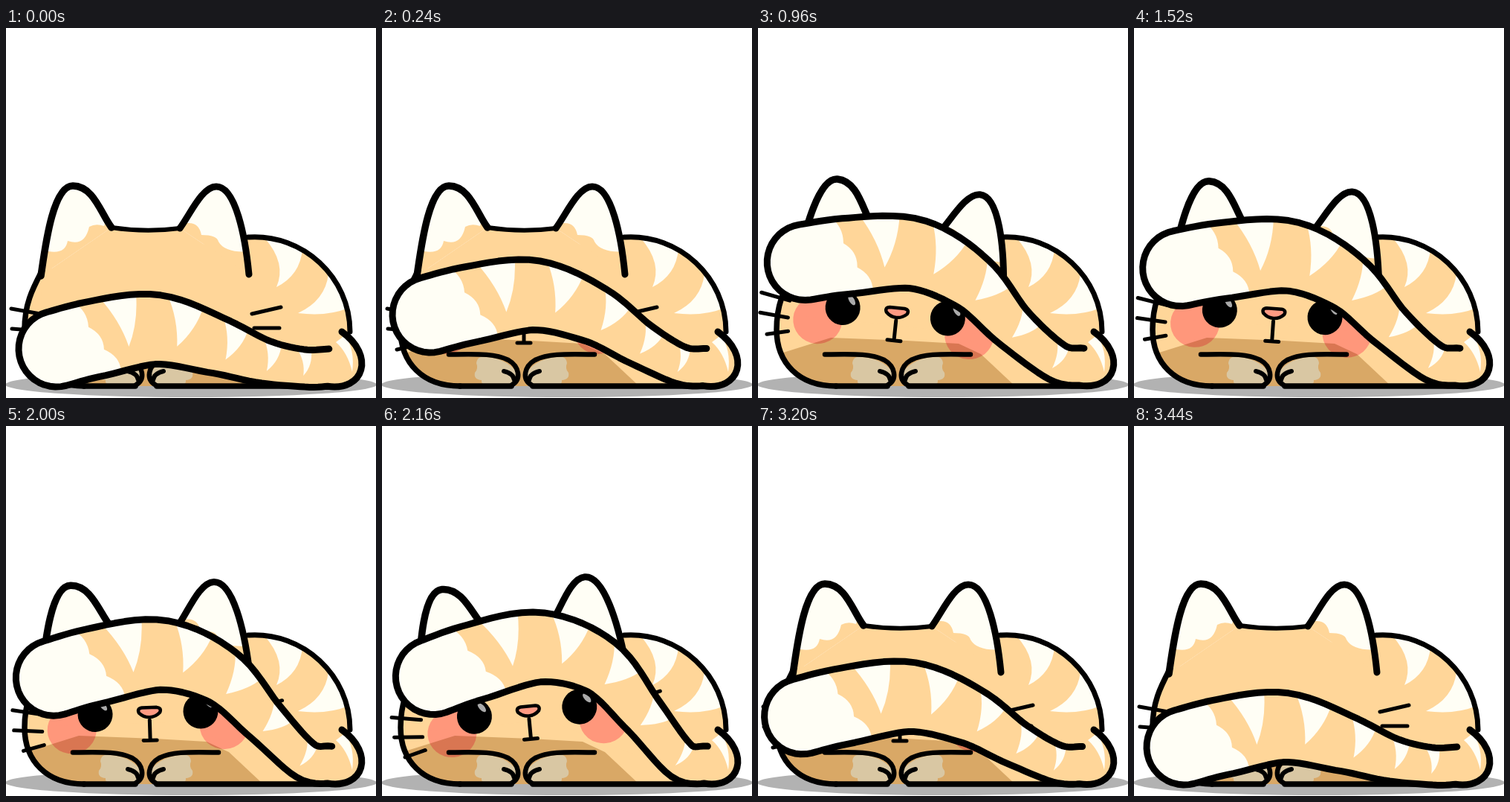
An HTML page with a canvas for the animation above (4400 ms loop, 498x497 px).

```html
<!DOCTYPE html>
<html lang="en">
<head>
<meta charset="utf-8">
<title>Peeking cat</title>
<style>
html, body { margin: 0; width: 100%; height: 100%; overflow: hidden; background: #fff; }
canvas { display: block; }
</style>
</head>
<body>
<canvas id="stage" width="498" height="497"></canvas>
<script>
const ctx = document.getElementById('stage').getContext('2d');
const ORANGE = '#ffd699', CREAM = '#fffef5';

const EAR_L = new Path2D('M47 333C52 300 62 212 90 212S128 250 142 268');
const EAR_R = new Path2D('M234 269C248 250 264 213 283 213C309 213 322 280 327 331');
const EARS = new Path2D(EAR_L);
EARS.addPath(EAR_R);
const BACK = 'M326 281C400 276 463 335 463 408';
const JAW = 'M49 325C36 350 25 370 25 405C25 450 55 481 105 481';

// Tail centre line from root to tip.
const TAIL_UP = [[436, 455], [402, 449], [345, 399], [287, 343], [208, 313], [118, 325], [62, 339]];
const TAIL_DOWN = [[436, 456], [402, 457], [346, 448], [282, 426], [201, 405], [118, 418], [68, 431]];

const clamp = v => Math.max(0, Math.min(1, v));
const mix = (a, b, t) => a + (b - a) * t;
const toPath = p => typeof p === 'string' ? new Path2D(p) : p;

function fill(path, color) {
  ctx.fillStyle = color;
  ctx.fill(toPath(path));
}

function line(path, width) {
  ctx.lineWidth = width;
  ctx.strokeStyle = '#000';
  ctx.stroke(toPath(path));
}

function oval(x, y, rx, ry, color, turn = 0) {
  ctx.beginPath();
  ctx.ellipse(x, y, rx, ry, turn, 0, 7);
  ctx.fillStyle = color;
  ctx.fill();
}

function tilted(angle, dx, dy, draw) {
  ctx.save();
  ctx.translate(186 + dx, 374 + dy);
  ctx.rotate(angle);
  ctx.translate(-186, -374);
  draw();
  ctx.restore();
}

function body() {
  oval(249, 479, 250, 17, '#b2b2b2');
  fill(BACK + 'L440 481H105L49 325Z', ORANGE);
  fill(JAW + 'H440Z', ORANGE);
  fill('M348 282Q378 316 364 348Q396 332 399 297Z', CREAM);
  fill('M434 330Q430 366 393 383Q432 388 461 376Z', CREAM);
  line(BACK, 7);
}

function head(pose) {
  fill('M47 333L142 268Q188 275 234 269L327 331V400H48Z', ORANGE);
  fill(EARS, ORANGE);
  ctx.save();
  ctx.clip(EARS);
  fill(pose.up > 0.6
    ? 'M40 340V200H150V270Z'
    : 'M40 300H57Q80 304 83 286Q106 294 112 267Q121 262 132 266L150 200H40Z', CREAM);
  fill('M235 262H246Q260 262 263 278Q284 278 286 287Q295 303 330 300V200H235Z', CREAM);
  ctx.restore();
  line('M142 268Q188 275 234 269', 6);
  line(EAR_L, 9.5);
  line(EAR_R, 9);
}

function paws() {
  const bothPaws = draw => {
    for (const side of [1, -1]) {
      ctx.save();
      ctx.translate(188, 0);
      ctx.scale(side, 1);
      draw();
      ctx.restore();
    }
  };
  bothPaws(() => fill('M-55 442Q-23 441 -6 463L-8 479H-45Q-55 480 -54 473Q-65 472 -63 463Q-58 458 -61 450Q-60 443 -55 442Z', CREAM));
  ctx.globalCompositeOperation = 'multiply';
  fill('M34 436L98 416L200 420L270 424L300 438L346 481H105C70 481 42 462 34 436Z', 'rgb(217,200,170)');
  ctx.globalCompositeOperation = 'source-over';
  bothPaws(() => {
    line('M-98 438.5C-58 438 -36 437 -18 446C-4 454 1 472 -14 480', 6.5);
    line('M-24 461Q-11 464 -10 473', 6);
  });
  line('M105 481H174M203 481H440', 7.5);
}

function face() {
  ctx.globalAlpha = 0.7;
  for (const x of [86, 291]) oval(x, 406, 33, 32, '#ff7d70');
  ctx.globalAlpha = 1;
  for (const x of [118, 260]) {
    oval(x, 386, 23.5, 23.5, '#000');
    oval(x + 11, 375, 3.5, 7.5, '#aaa', -0.65);
  }
  const nose = 'M181 379H201Q208 380 205 386Q199 392 191 392T177 386Q174 380 181 379Z';
  fill(nose, '#ff9a83');
  line(nose, 4.5);
  line('M191 396V422M182 423H200', 5);
}

function whiskers() {
  line('M7 377L46 384M8 404L46 407M20 432L48 425M331 384L370 375M334 403H368', 5);
}

// Blends the two tail poses and lets the loose end follow the head.
function tailKeys(pose) {
  const sin = Math.sin(pose.angle), cos = Math.cos(pose.angle);
  return TAIL_UP.map((u, i) => {
    const d = TAIL_DOWN[i];
    let x = mix(d[0], u[0], pose.up);
    const y = mix(d[1], u[1], pose.up);
    x -= pose.swing * clamp((200 - x) / 150);
    const w = clamp((400 - x) / 130), dx = x - 186, dy = y - 374;
    return [x + w * (dx * cos - dy * sin - dx + pose.tailX),
            y + w * (dx * sin + dy * cos - dy + pose.tailY)];
  });
}

// Point on a smooth curve through the keys, s from 0 to 1.
function along(keys, s) {
  const last = keys.length - 1, i = Math.min(last - 1, Math.floor(s * last)), t = s * last - i;
  const at = k => keys[Math.max(0, Math.min(last, k))];
  const [a, b, c, d] = [at(i - 1), at(i), at(i + 1), at(i + 2)];
  return [0, 1].map(k => b[k] + t / 2 * (c[k] - a[k] +
    t * (2 * a[k] - 5 * b[k] + 4 * c[k] - d[k] + t * (3 * (b[k] - c[k]) + d[k] - a[k]))));
}

function tail(pose) {
  const keys = tailKeys(pose);
  // Side 1 is the upper edge, -1 the lower one; turn swings round the tip.
  const spot = (s, side, turn = 0) => {
    const [x, y] = along(keys, s), p = along(keys, Math.max(0, s - 0.01)), q = along(keys, Math.min(1, s + 0.01));
    const angle = Math.atan2(q[1] - p[1], q[0] - p[0]) + Math.PI / 2 - turn;
    const r = side * (38 - 13 * Math.cos(Math.PI * clamp((s - 0.15) / 0.7)));
    return [x + r * Math.cos(angle), y + r * Math.sin(angle)];
  };

  const shape = new Path2D();
  for (let s = 0; s < 1; s += 0.02) shape.lineTo(...spot(s, 1));
  for (let turn = 0; turn < Math.PI; turn += 0.15) shape.lineTo(...spot(1, 1, turn));
  for (let s = 1; s > 0.03; s -= 0.02) shape.lineTo(...spot(s, -1));
  shape.bezierCurveTo(482, 488, 497, 440, 452, 408);
  fill(shape, ORANGE);

  ctx.save();
  ctx.clip(shape);
  const cuff = new Path2D();
  let from = spot(0.875, 1.1);
  cuff.moveTo(...from);
  for (let i = 1; i < 4; i++) {
    const to = spot(0.875 - 0.033 * i, 1 - 0.66 * i);
    cuff.quadraticCurveTo((from[0] + to[0]) / 2 + 10, (from[1] + to[1]) / 2 - 5, ...to);
    from = to;
  }
  cuff.lineTo(from[0] - 10, 497);
  cuff.lineTo(-20, 497);
  cuff.lineTo(-20, 200);
  fill(cuff, CREAM);

  for (let i = 0; i < 5; i++) {
    const s = 0.79 - 0.143 * i;
    const a = spot(s, 1.05), b = spot(s - 0.083, 1.05), tip = spot(s - 0.048, -0.4);
    const stripe = new Path2D();
    stripe.moveTo(...a);
    stripe.lineTo(...b);
    stripe.quadraticCurveTo((b[0] + tip[0]) / 2 + 8, (b[1] + tip[1]) / 2 + 4, ...tip);
    stripe.quadraticCurveTo((a[0] + tip[0]) / 2 + 8, (a[1] + tip[1]) / 2 - 2, ...a);
    fill(stripe, CREAM);
  }
  fill('M444 422L456 413Q470 432 466 462Q460 436 444 422Z', CREAM);
  ctx.restore();
  line(shape, 9);
}

function poseAt(step) {
  const ramp = (start, count) => clamp((step - start + 1) / count);
  const rise = ramp(1, 6), drop = ramp(40, 4);
  const up = rise * rise * (3 - 2 * rise) * (1 - drop) ** 2.8;
  const tilt = ramp(9, 4) - ramp(19, 3) - ramp(25, 3) + ramp(34, 3);
  const right = Math.max(tilt, 0), left = Math.max(-tilt, 0);
  return {
    up,
    swing: drop > 0 ? 26 * up * (1 - up) : 0,
    angle: 0.102 * right - 0.092 * left,
    earX: 5 * left, earY: -2 * left,
    faceX: 5 * left - 3 * right, faceY: -2 * left - 3.5 * right,
    tailX: 10 * left - 3 * right, tailY: -14 * left - 12 * right
  };
}

function draw(now) {
  const pose = poseAt(Math.floor(now % 4400 / 80));
  ctx.fillStyle = '#fff';
  ctx.fillRect(0, 0, 498, 497);
  ctx.lineCap = ctx.lineJoin = 'round';
  body();
  tilted(pose.angle, pose.earX, pose.earY, () => head(pose));
  tilted(pose.angle, pose.faceX, pose.faceY, () => {
    if (pose.up > 0.3) face();
    whiskers();
  });
  paws();
  line(JAW, 7.5);
  tail(pose);
}

const start = performance.now();
function tick() {
  draw(performance.now() - start);
  requestAnimationFrame(tick);
}
tick();
</script>
</body>
</html>
```
